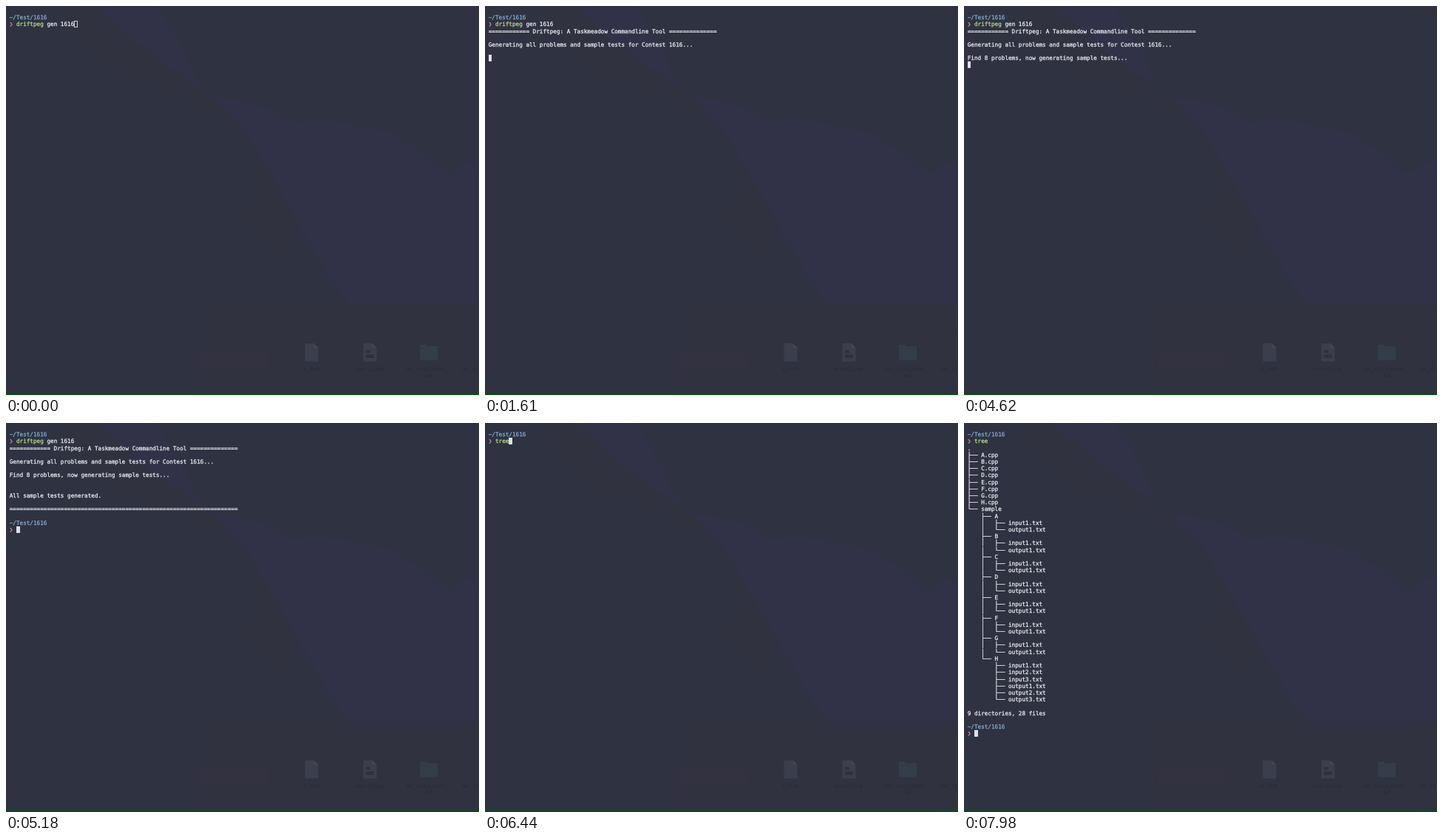
An HTML page for the animation above (8330 ms loop, 640 by 527 pixels).

```html
<!DOCTYPE html>
<html lang="en">
<head>
<meta charset="utf-8">
<title>Terminal session</title>
<style>
html, body { margin: 0; width: 100%; height: 100%; overflow: hidden; background: #2f3241; }
#stage { position: relative; width: 640px; height: 527px; overflow: hidden; }
svg { position: absolute; left: 0; top: 0; }
svg text { font: 7px "Liberation Sans", sans-serif; fill: #282b38; text-anchor: middle; }
#screen, #cursor { position: absolute; font: 7.675px/9.209px "DejaVu Sans Mono", monospace; }
#screen {
  left: 4.7px; top: 11.2px; margin: 0; color: #eff0f6; white-space: pre;
  text-rendering: geometricPrecision; -webkit-text-stroke: .25px;
}
#cursor { box-sizing: border-box; width: 4.62px; height: 9.2px; background: #dde0ea; }
#cursor.hollow { background: none; border: 1px solid #c9ccd6; }
.path { color: #84aed3; }
.mark { color: #cf7f8b; display: inline-block; width: 4.62px; }
.ok { color: #b9e08f; }
.bad { color: #e0808a; }
.hint { color: #6c7183; }
</style>
</head>
<body>
<div id="stage">
  <svg width="640" height="527" viewBox="0 0 640 527">
    <path fill="#313240" d="M84 0 94 42 130 80 200 108 262 136 300 152 328 192 340 250 315 290 350 315 378 336 400 312 350 215 290 130 268 124 205 0Z"/>
    <path fill="#313247" d="M120 0H203L235 50 270 125 310 126 360 141 390 159 420 152 475 162 520 171 560 196 600 229 622 211 640 216V405H464L440 370 400 300 350 215 322 165 285 130 240 95 180 52Z"/>
    <path fill="#303240" d="M262 404H640V520H262Z"/>
    <path fill="#323240" d="M264 470H354V492H264Z"/>
    <path fill="none" stroke="#2e303e" d="M260.500 520V404.500H640M364.500 520V445.500H640"/>
    <g fill="#3a3e4d">
      <path id="sheet" d="M404.500 457H416.500L422.500 463V481.500H404.500Z"/>
      <use href="#sheet" x="79"/>
    </g>
    <path fill="#434756" d="M416.500 457V463H422.500ZM495.500 457V463H501.500Z"/>
    <path fill="#2e323f" d="M487 466H493V470H487ZM487 472H498V477H487Z"/>
    <path fill="#343e4b" d="M560 459H568L570 461H584V479.500H560Z"/>
    <path fill="#313a48" d="M560 463H584V464H560Z"/>
    <text x="413" y="494">a_draft</text>
    <text x="492" y="494">scan (2).png</text>
    <text x="570" y="494">lab_v1.0.2_notes_</text>
    <text x="572" y="503">list</text>
    <text x="628" y="494">lab_v1</text>
    <rect y="525" width="640" height="2" fill="#06520e"/>
  </svg>
  <div id="cursor"></div>
  <pre id="screen"></pre>
</div>
<script>
const LOOP = 8330, CHAR = 4.62, LINE = 9.209;
const screen = document.getElementById('screen');
const cursor = document.getElementById('cursor');

const span = (cls, text) => `<span class="${cls}">${text}</span>`;
const prompt = (input = '') => [span('path', '~/Test/1616'), span('mark', '❯') + ' ' + input];
const bar = n => '='.repeat(n);

function branch(names, indent) {
  return names.map((name, i) => indent + (i < names.length - 1 ? '├── ' : '└── ') + name);
}

function treeLines() {
  const letters = [...'ABCDEFGH'];
  const lines = ['.', ...branch([...letters.map(c => c + '.cpp'), 'sample'], '')];
  branch(letters, '    ').forEach((dir, i) => {
    const last = i === letters.length - 1;
    const cases = last ? [1, 2, 3] : [1];
    const files = ['input', 'output'].flatMap(kind => cases.map(n => kind + n + '.txt'));
    lines.push(dir, ...branch(files, last ? '        ' : '    │   '));
  });
  return [...lines, '', '9 directories, 28 files', ''];
}

const command = prompt(span('ok', 'driftpeg') + ' gen 1616');
const started = [
  ...command,
  `${bar(12)} Driftpeg: A Taskmeadow Commandline Tool ${bar(14)}`,
  '', 'Generating all problems and sample tests for Contest 1616...', ''
];
const found = [...started, 'Find 8 problems, now generating sample tests...'];
const done = [...found, '', '', 'All sample tests generated.', '', bar(67), '', ...prompt()];
const typed = n => prompt(
  span(n < 4 ? 'bad' : 'ok', 'tree'.slice(0, n)) + span('hint', 'tree'.slice(n)));
const listed = [...prompt(span('ok', 'tree')), ...treeLines(), ...prompt()];

// start time, lines, cursor column, cursor row, hollow cursor
const scenes = [
  [0, command, 19, 1, true],
  [280, command, 19, 1],
  [420, command, 0, 2],
  [490, started, 0, 6],
  [2590, found, 0, 7],
  [4690, done, 2, 14],
  [5250, prompt(), 2, 1],
  [5880, typed(1), 3, 1],
  [6020, typed(2), 4, 1],
  [6160, typed(3), 5, 1],
  [6300, typed(4), 6, 1],
  [6580, listed, 2, 44]
];

let shown;
function draw(now) {
  const t = now % LOOP;
  const scene = scenes.findLast(s => s[0] <= t) || scenes[0];
  if (scene !== shown) {
    const [, lines, col, row, hollow] = shown = scene;
    screen.innerHTML = lines.join('\n');
    cursor.style.left = 4.7 + col * CHAR + 'px';
    cursor.style.top = 10.8 + row * LINE + 'px';
    cursor.className = hollow ? 'hollow' : '';
  }
}

const start = performance.now();
function tick() {
  draw(performance.now() - start);
  requestAnimationFrame(tick);
}
tick();
</script>
</body>
</html>
```
